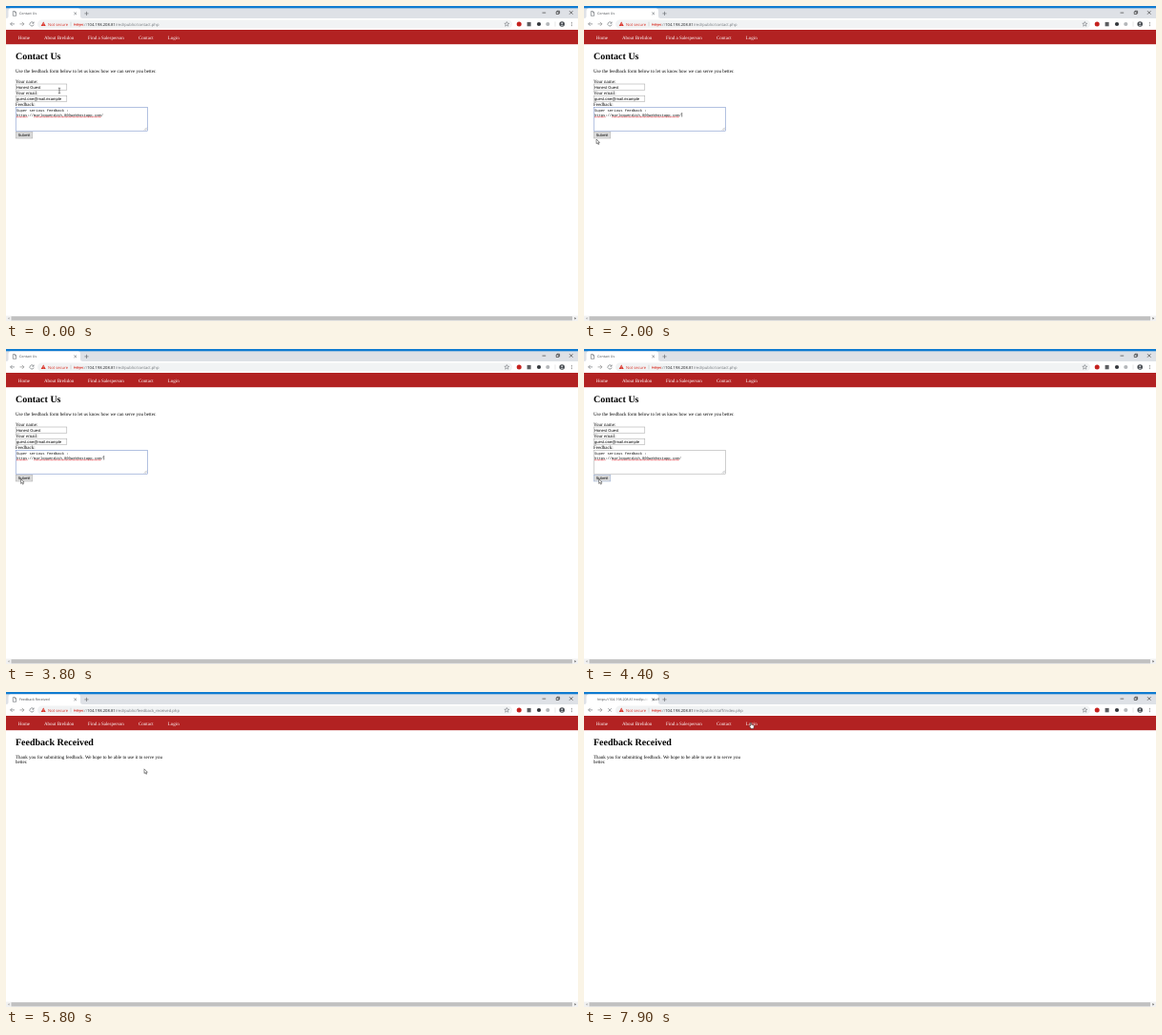
An HTML page for the animation above (8000 ms loop, 600 px wide and 331 px high).

```html
<!DOCTYPE html>
<html lang="en">
<head>
<meta charset="utf-8">
<title>Contact form</title>
<style>
  html, body { margin: 0; width: 100%; height: 100%; overflow: hidden; background: #fff; }
  svg { display: block; width: 100vw; height: 100vh; }
  text { white-space: pre; text-rendering: geometricPrecision; }
  .ui { font: 4.16px "Open Sans", sans-serif; fill: #70757a; }
  .tab { font-size: 3.6px; fill: #45494d; }
  .page { font: 5px "Liberation Serif", serif; fill: #000; }
  .page .h1 { font-size: 10px; font-weight: bold; }
  .nav text { fill: #fff; }
  .field { font: 4.17px "Liberation Sans", sans-serif; }
  .mono { font: 3.81px "Liberation Mono", monospace; fill: #111; }
  .line { fill: none; stroke: #5f6368; stroke-width: .6; }
  .box { fill: #fff; stroke: #a0a0a0; stroke-width: .5; }
</style>
</head>
<body>
<svg viewBox="0 0 600 331" preserveAspectRatio="none">
  <defs>
    <linearGradient id="fade">
      <stop offset="0" stop-color="#fff" stop-opacity="0"/>
      <stop offset="1" stop-color="#fff"/>
    </linearGradient>
  </defs>
  <rect width="600" height="331" fill="#fff"/>

  <!-- browser frame -->
  <rect width="600" height="13" fill="#dee1e6"/>
  <rect width="600" height="2.3" fill="#0f7bd0"/>
  <path d="M0 13Q2.500 13 2.500 10.500V5Q2.500 2.600 5 2.600H75.500Q78 2.600 78 5V10.500Q78 13 80.500 13Z" fill="#fff"/>
  <g class="ui">
    <text id="tabTitle" class="tab" x="14" y="9.300"></text>
    <rect x="60" y="4" width="8" height="8" fill="url(#fade)"/>
    <rect x="68" y="4" width="3" height="8" fill="#fff"/>
  </g>
  <path id="favicon" class="line" d="M7.300 5.600H9.400L10.600 6.800V10.300H7.300ZM9.300 5.700V7H10.500"/>
  <path class="line" d="M71.300 6.500L74 9.200M74 6.500L71.300 9.200M84.500 5.800V10M82.400 7.900H86.600"/>
  <path class="line" style="stroke:#222" d="M562.500 7.100H566.200M577.200 6H579.800V8.500H577.200ZM578 6V5.200H580.600V7.700H579.800M591 5.200L594.500 8.700M594.500 5.200L591 8.700"/>
  <rect x="33" y="14.600" width="498" height="8.800" rx="4.400" fill="#f1f3f4"/>
  <path class="line" d="M9 18.900H4.600M6.600 16.900L4.600 18.900L6.600 20.900"/>
  <path class="line" style="stroke:#777" d="M14.500 18.900H18.900M16.900 16.900L18.900 18.900L16.900 20.900"/>
  <path id="reload" class="line" d="M28.700 17.600A2.100 2.100 0 1 0 29.100 19.500M29.100 16.500V18.200H27.400"/>
  <path id="stop" class="line" d="M25.300 17.200L28.800 20.700M28.800 17.200L25.300 20.700"/>
  <path d="M39.200 16.600L41.700 20.900H36.700Z" fill="#d93025"/>
  <path d="M39.200 18V19.500M39.200 20V20.500" stroke="#fff" stroke-width=".5"/>
  <g class="ui">
    <text x="44" y="20.500" style="fill:#d93025">Not secure</text>
    <path d="M68 16.800V21.300" stroke="#bbb" stroke-width=".5"/>
    <text x="71" y="20.500"><tspan fill="#d93025" text-decoration="line-through">https</tspan>://<tspan fill="#202124">104.198.208.81</tspan><tspan id="path"></tspan></text>
  </g>
  <path class="line" style="stroke-width:.5" d="M525.300 16.500L526 18.200L527.800 18.300L526.400 19.500L526.900 21.200L525.300 20.200L523.700 21.200L524.200 19.500L522.800 18.300L524.600 18.200Z"/>
  <circle cx="538.200" cy="19" r="2.500" fill="#c5221f"/>
  <rect x="546.600" y="16.900" width="4" height="4.400" fill="#5b5d60"/>
  <circle cx="559" cy="19" r="2.100" fill="#33373b"/>
  <circle cx="568.300" cy="19" r="2.100" fill="#b3b6b9"/>
  <path d="M576 16.500V21.500" stroke="#ccc" stroke-width=".5"/>
  <circle cx="583.200" cy="19" r="2.800" fill="#474b50"/>
  <circle cx="583.200" cy="18.200" r="1" fill="#c9ccd0"/>
  <path d="M581.500 20.700Q583.200 18.600 584.900 20.700Z" fill="#c9ccd0"/>
  <path d="M593.400 16.900V21.300" stroke="#444" stroke-width=".8" stroke-dasharray=".8 .9"/>

  <!-- site header -->
  <rect y="25" width="600" height="15.200" fill="#b22222"/>
  <g class="page nav">
    <text x="12.800" y="34.600">Home</text>
    <text x="40" y="34.600">About Brelidon</text>
    <text x="86" y="34.600">Find a Salesperson</text>
    <text x="139" y="34.600">Contact</text>
    <text x="169.700" y="34.600">Login</text>
  </g>

  <g id="form" class="page">
    <text class="h1" x="10" y="56">Contact Us</text>
    <text x="10" y="69.900">Use the feedback form below to let us know how we can serve you better.</text>
    <text x="10" y="80.700">Your name:</text>
    <text x="10" y="92.700">Your email:</text>
    <text x="10" y="104.900">Feedback:</text>
    <rect class="box" x="10.200" y="82" width="53.600" height="6.200"/>
    <rect class="box" x="10.200" y="94.200" width="53.600" height="6.200"/>
    <text class="field" x="11" y="86.700">Honest Guest</text>
    <text class="field" x="11" y="98.800">guest.one@mail.example</text>
    <rect id="area" class="box" x="10.200" y="106.400" width="138.300" height="24.800"/>
    <path class="line" style="stroke-width:.4" d="M145 130.500L147.800 127.700M146.700 130.500L147.800 129.400"/>
    <text class="mono" x="10.900" y="110.900">Super serious feedback :</text>
    <text class="mono" x="10.900" y="115.700">https://marloquendish.000webhostapp.com/</text>
    <path d="M11 116.700H22.500M29.300 116.700H100" stroke="#e0303a" stroke-width=".75" stroke-dasharray="1 .35"/>
    <path id="caret" d="M102.700 112V116.500" stroke="#000" stroke-width=".5"/>
    <rect id="button" x="10.200" y="132.500" width="17.600" height="6.500" fill="#dedede" stroke="#a8a8a8" stroke-width=".5"/>
    <text class="field" x="12.500" y="137.300">Submit</text>
  </g>

  <g id="thanks" class="page">
    <text class="h1" x="10" y="56">Feedback Received</text>
    <text x="10" y="69.900">Thank you for submitting feedback. We hope to be able to use it to serve you</text>
    <text x="10" y="75.400">better.</text>
  </g>

  <!-- horizontal scrollbar -->
  <rect y="325.600" width="600" height="5.400" fill="#f1f1f1"/>
  <rect x="5.500" y="326.100" width="588.500" height="4.300" fill="#c1c1c1"/>
  <path d="M3.500 327L2 328.300L3.500 329.600Z" fill="#a3a3a3"/>
  <path d="M596.500 327L598 328.300L596.500 329.600Z" fill="#505050"/>

  <g id="pointer" stroke-linejoin="round">
    <path id="arrow" d="M0 0V4.700L1.100 3.700L1.900 5.500L2.800 5.100L2 3.400H3.400Z" fill="#fff" stroke="#222" stroke-width=".5"/>
    <path id="beam" d="M-1.200-2.700H-.3L0-2.400L.3-2.700H1.200M0-2.400V2.400M-1.200 2.700H-.3L0 2.400L.3 2.700H1.200" fill="none" stroke="#222" stroke-width=".6"/>
    <path id="hand" d="M-.5 0Q0-.7 .5 0V2L3 2.600Q3.500 2.800 3.400 3.500L2.900 6H.3L-1.600 3.700Q-1.400 2.800-.5 3.400Z" fill="#fff" stroke="#222" stroke-width=".5"/>
  </g>
</svg>
<script>
const $ = id => document.getElementById(id);
const LOOP = 8000, TICK = 100;

// time, x, y, shape
const moves = [
  [0, 56, 89, "beam"], [500, 56, 89, "beam"], [1100, 54, 90, "beam"],
  [1200, 51.6, 91.3, "arrow"], [1300, 37, 125, "beam"],
  [1400, 21, 139.5, "arrow"], [1600, 13, 140, "arrow"],
  [2000, 13, 140, "arrow"], [2400, 15.6, 136.7, "arrow"],
  [4600, 15.6, 136.7, "arrow"], [5000, 83, 184, "arrow"],
  [5100, 89, 189, "arrow"], [5300, 104, 168, "arrow"],
  [5900, 153.2, 63.4, "arrow"], [7100, 153.2, 63.4, "arrow"],
  [7300, 158, 79, "arrow"], [7600, 175, 32.4, "hand"], [8000, 175, 32.4, "hand"]
];

const pages = [
  { from: 0, title: "Contact Us", path: "/red/public/contact.php" },
  { from: 4700, title: "Feedback Received", path: "/red/public/feedback_received.php" },
  { from: 7700, title: "https://104.198.208.81/red/public/staff", path: "/red/public/staff/index.php" }
];

const show = (id, on) => { $(id).style.display = on ? "" : "none"; };
const between = (t, a, b) => t >= a && t < b;

function movePointer(t) {
  const i = moves.findIndex((m, k) => t >= m[0] && t < moves[k + 1][0]);
  const [t0, x0, y0, shape] = moves[i], [t1, x1, y1] = moves[i + 1];
  const p = (t - t0) / (t1 - t0);
  $("pointer").setAttribute("transform", `translate(${x0 + (x1 - x0) * p} ${y0 + (y1 - y0) * p})`);
  for (const s of ["arrow", "beam", "hand"]) show(s, s === shape);
}

function draw(now) {
  const t = Math.floor(now % LOOP / TICK) * TICK;
  const page = pages.filter(p => t >= p.from).pop();
  const submitted = t >= 4200;
  const loading = between(t, 4500, 4800) || t >= 7700;

  $("tabTitle").textContent = page.title;
  $("path").textContent = page.path;
  show("form", t < 4700);
  show("thanks", t >= 4700);
  show("favicon", !loading);
  show("reload", !loading);
  show("stop", loading);
  show("caret", between(t, 500, 4200) && (t - 500) % 1040 < 520);
  $("area").style.stroke = submitted ? "#a0a0a0" : "#6684c4";
  $("button").style.stroke = submitted ? "#8fa6cf" : "#a8a8a8";
  movePointer(t);
  requestAnimationFrame(() => draw(performance.now() - start));
}

const start = performance.now();
draw(0);
</script>
</body>
</html>
```
